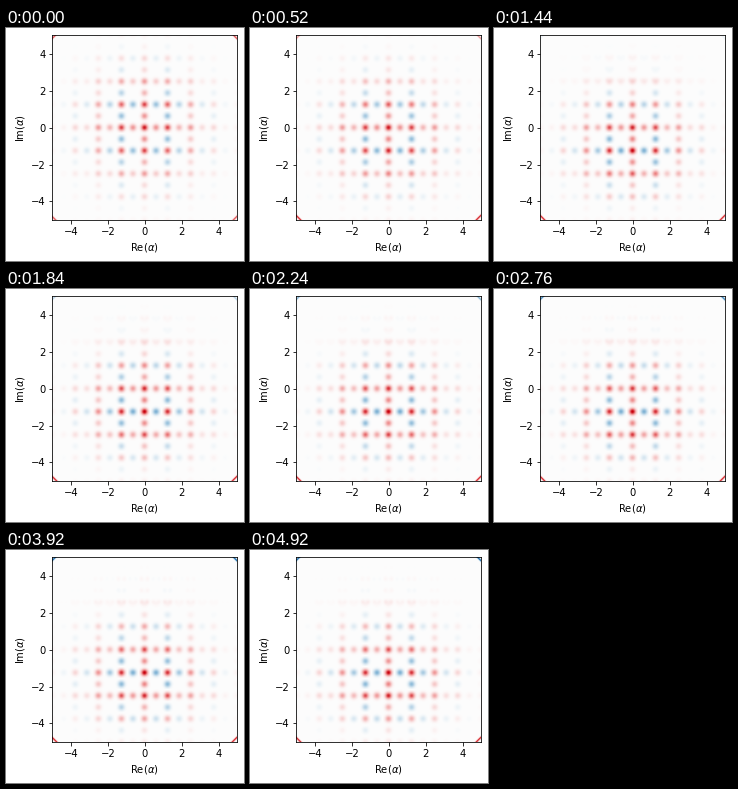
These frames come from a looping animation (238x233 px, 5000 ms). A matplotlib script:

```python
import numpy as np
import matplotlib.pyplot as plt
from matplotlib.animation import FuncAnimation
from matplotlib.colors import LinearSegmentedColormap

W, H, DPI = 238, 233, 72
TICKS, TICK_MS, STATES = 125, 40, 100
LATTICE = np.sqrt(np.pi / 2)

# 100 states spread over 125 ticks: about every fifth tick repeats the picture
HOLDS = {int(1.3 + 5.15 * j) for j in range(25)}

CMAP = LinearSegmentedColormap.from_list(
    "wigner", ["#075aa5", "#7fb2d4", "#fdfdfd", "#ee8f8f", "#c8000c"], N=512)

axis = np.linspace(-5, 5, 201)
X, Y = np.meshgrid(axis, axis)
R = np.hypot(X, Y)

# Lattice sites in half steps; odd indices carry the logical part
idx = np.arange(-9, 10)
site = idx * LATTICE / 2
col, row = np.meshgrid(idx, idx)
sign_x = np.where(row // 2 % 2 == 0, 1, -1)
sign_y = np.where(col // 2 % 2 == 0, 1, -1)
odd_col, odd_row = col % 2 == 1, row % 2 == 1
WEIGHT = np.where(odd_col & odd_row, 0.0,
                  np.where(odd_col, 0.52 * sign_x,
                           np.where(odd_row, 0.52 * sign_y, 1.0)))


def peaks(shift=0.0, sharp=35):
    """Gaussian profile of every site along one axis."""
    return np.exp(-sharp * (axis[:, None] - site[None, :] - shift) ** 2)


SPOT = peaks()
SPLIT = 0.8 * (peaks(-0.16, 80) + peaks(0.16, 80))
RAISED = peaks(0.08, 60)


def wigner(s):
    """Grid state at progress s in [0, 1]: the envelope sinks, the grid stays."""
    centre = -1.8 * (1 - np.exp(-s / 0.35))
    below = 0.125 + 0.095 * min(1, s / 0.5)
    d = site - centre
    env_y = np.exp(-np.where(d < 0, below, 0.125) * d ** 2)
    env_x = np.exp(-0.125 * site ** 2)
    amp = (0.92 + 0.1 * min(1, s / 0.4)) * WEIGHT * env_y[:, None] * env_x

    # Upper rows break up into finer, slightly raised dots
    blur = np.clip((s - 0.1) / 0.6, 0, 1) * np.clip((site - 1.8) / 1.6, 0, 1)
    w = SPOT @ (amp * (1 - blur)[:, None]) @ SPOT.T
    w += RAISED @ (amp * (1.6 * blur)[:, None]) @ SPLIT.T

    # Truncation ring, only seen in the corners
    top = np.clip(0.75 * (1 - s / 0.27), -0.95, 0.75)
    bottom = 0.75 + 0.2 * min(1, s / 0.1)
    radius = np.where(Y > 0, 6.97, 6.97 - 0.04 * min(1, s / 0.1))
    ring = np.exp(-((R - radius) / 0.045) ** 2)
    return w + ring * np.where(Y > 0, top, bottom)


def state_at(tick):
    return tick - sum(h <= tick for h in HOLDS)


plt.rcParams["font.family"] = "DejaVu Sans"
plt.rcParams["font.size"] = 10
fig = plt.figure(figsize=(W / DPI, H / DPI), dpi=DPI, facecolor="white")
left, top_edge, width, height = 46.4, 7.3, 184.8, 184.6
ax = fig.add_axes([left / W, 1 - (top_edge + height) / H, width / W, height / H])
image = ax.imshow(wigner(0), extent=(-5, 5, -5, 5), origin="lower",
                  aspect="auto", cmap=CMAP, vmin=-1, vmax=1)
ax.set_xticks([-4, -2, 0, 2, 4])
ax.set_yticks([-4, -2, 0, 2, 4])
ax.set_xlabel(r"$\mathrm{Re}(\alpha)$")
ax.set_ylabel(r"$\mathrm{Im}(\alpha)$")


def update(tick):
    image.set_data(wigner(state_at(tick) / (STATES - 1)))
    return (image,)


anim = FuncAnimation(fig, update, frames=TICKS, interval=TICK_MS,
                     repeat=True, repeat_delay=0, blit=False)
plt.show()
```
